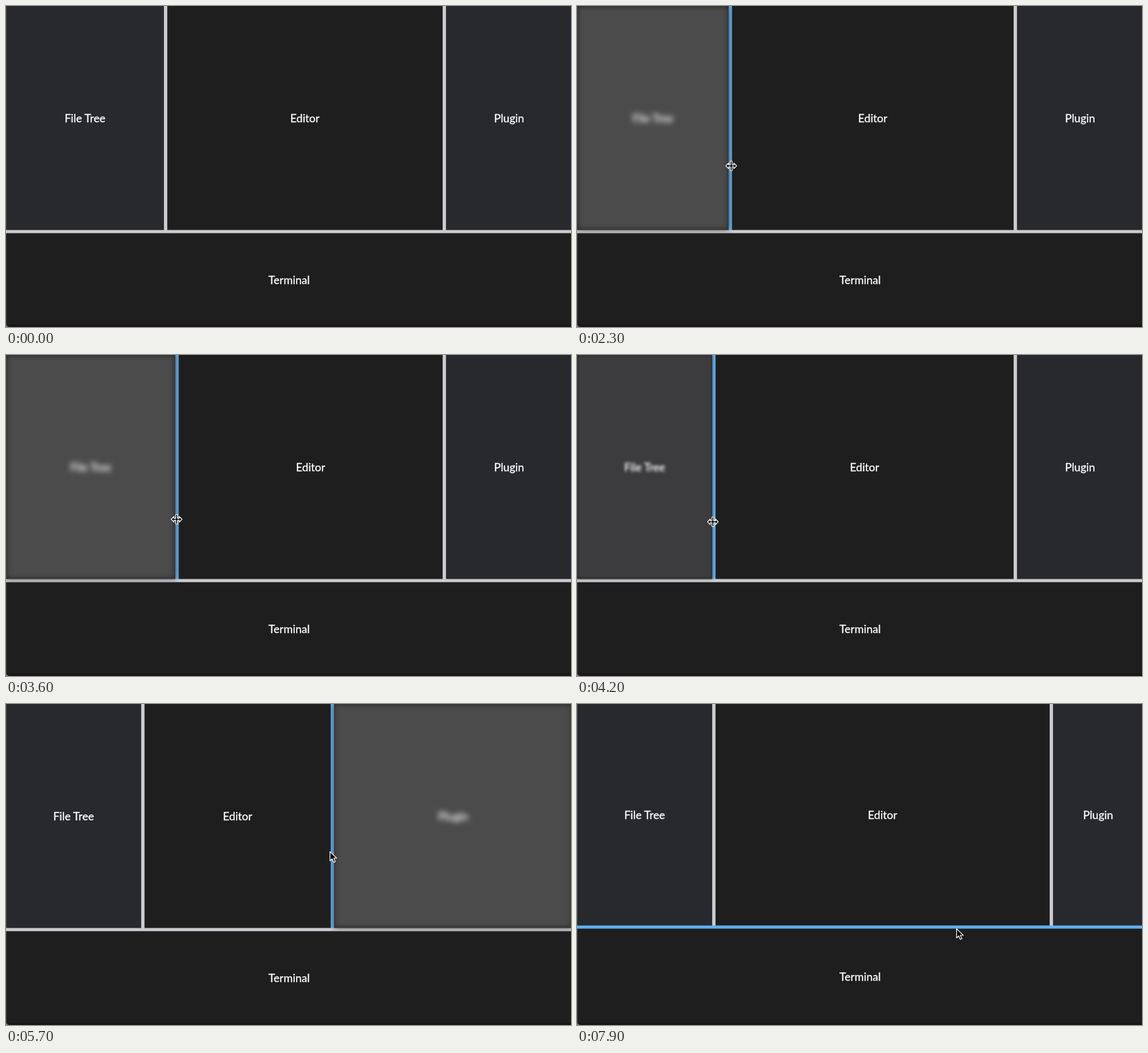
An HTML page for the animation above (8000 ms loop, 894 by 508 pixels).

```html
<!DOCTYPE html>
<html lang="en">
<head>
<meta charset="utf-8">
<title>Resizable panes</title>
<style>
  html, body { margin: 0; width: 100%; height: 100%; overflow: hidden; background: #1e1e1e; }
  #stage { position: relative; width: 894px; height: 508px; overflow: hidden; background: #1e1e1e; }
  #stage > * { position: absolute; }
  .pane {
    display: flex; align-items: center; justify-content: center;
    color: #fff; font: 17.6px Lato, sans-serif; white-space: nowrap;
    -webkit-text-stroke: .3px #fff;
  }
  #editor, #terminal { background: #1e1e1e; }
  #base { left: 0; top: 504px; width: 894px; height: 4px; background: #1c1518; }
  #corner { left: 0; top: 500px; width: 8px; height: 8px;
    background: radial-gradient(circle at 8px 0, transparent 8px, #77767a 9.5px); }
  #edge { left: 0; top: 0; width: 1px; height: 504px; background: rgba(255, 255, 255, .14); }
  #bars { left: 0; top: 0; z-index: 1; }
  #pointer { left: 0; top: 0; z-index: 3; overflow: visible; }
  #pointer path { fill: #000; stroke: #fff; stroke-width: 1.2; stroke-linejoin: round; }
</style>
</head>
<body>
<div id="stage">
  <div id="editor" class="pane">Editor</div>
  <div id="terminal" class="pane">Terminal</div>
  <div id="tree" class="pane">File Tree</div>
  <div id="plugin" class="pane">Plugin</div>
  <svg id="bars" width="894" height="508">
    <rect id="leftBar"/>
    <rect id="rightBar"/>
    <rect id="bottomBar"/>
  </svg>
  <div id="base"></div>
  <div id="corner"></div>
  <div id="edge"></div>
  <svg id="pointer" width="1" height="1">
    <path id="arrow" d="M.6 .6V15.2L4 12L6.4 17.6L9 16.5L6.6 11H11.2Z"/>
    <path id="resize" d="M-8.5 0L-4 -4.5V-1.4H-1.4V-7.5H1.4V-1.4H4V-4.5L8.5 0L4 4.5V1.4H1.4V7.5H-1.4V1.4H-4V4.5Z"/>
  </svg>
</div>
<script>
const WIDTH = 896, HEIGHT = 508, BAR = 5, LOOP = 8000, STEP = 100;
const $ = id => document.getElementById(id);

const ramp = (t, start, end) => Math.min(1, Math.max(0, (t - start) / (end - start)));
const ease = (t, start, end) => {
  const k = ramp(t, start, end);
  return k * k * (3 - 2 * k);
};
const pulse = (t, on, off, fade) => ramp(t, on, on + fade) - ramp(t, off, off + fade);

function blend(from, to, k) {
  return `rgb(${from.map((c, i) => Math.round(c + (to[i] - c) * k))})`;
}

function placePane(id, x, y, w, h) {
  const style = $(id).style;
  style.left = x + "px";
  style.top = y + "px";
  style.width = w + "px";
  style.height = h + "px";
  return style;
}

// A held pane turns grey and blurs out over its neighbouring bars.
function drawSidePane(id, blur, ...box) {
  const style = placePane(id, ...box);
  style.background = blend([40, 41, 44], [75, 75, 75], blur);
  style.filter = blur ? `blur(${4 * blur}px)` : "none";
  style.zIndex = blur ? 2 : 0;
}

function drawBar(id, glow, x, y, width, height) {
  const fill = blend([203, 203, 208], [97, 175, 239], glow);
  for (const [name, value] of Object.entries({ x, y, width, height, fill })) {
    $(id).setAttribute(name, value);
  }
}

function pointerAt(t, left, right, bottom) {
  let x = 365, y = 424;
  const glide = (start, end, toX, toY) => {
    const k = ease(t, start, end);
    x += (toX - x) * k;
    y += (toY - y) * k;
  };
  glide(900, 1000, 287, 366);
  glide(1300, 1700, left + 5, 255);
  glide(1700, 2900, left + 3, 250);
  glide(2900, 4000, left + 1, 264);
  glide(4200, 4800, right, 245);
  glide(5000, 5700, right - 2, 233);
  glide(6100, 6800, right + 6, 227);
  glide(7100, 7600, 600, bottom + 5);
  return [Math.round(x), Math.round(y)];
}

function draw(t) {
  const left = Math.round(250 - 100 * ease(t, 2200, 2700) + 124 * ease(t, 2700, 3450) - 60 * ease(t, 3500, 4000));
  const right = Math.round(691 - 191 * ease(t, 5200, 5800) + 248 * ease(t, 6100, 6700));
  const bottom = 354 - 4 * ramp(t, 7800, 7900);

  placePane("editor", left + BAR, 0, right - left - BAR, bottom);
  placePane("terminal", 0, bottom + BAR, WIDTH, HEIGHT - bottom - BAR);
  drawSidePane("tree", pulse(t, 1900, 4050, 350), 0, 0, left, bottom);
  drawSidePane("plugin", pulse(t, 5000, 6850, 350), right + BAR, 0, WIDTH - right - BAR, bottom);

  drawBar("leftBar", pulse(t, 1700, 4200, 200), left - .1, 0, BAR + .3, bottom + 1);
  drawBar("rightBar", pulse(t, 4800, 7000, 200), right - .1, 0, BAR + .3, bottom + 1);
  drawBar("bottomBar", ramp(t, 7500, 7700), 0, bottom + .5, WIDTH, BAR);

  const [x, y] = pointerAt(t, left, right, bottom);
  const resizing = t >= 1800 && t < 4300;
  $("pointer").style.display = t < 900 ? "none" : "block";
  $("pointer").style.transform = `translate(${x}px, ${y}px)`;
  $("arrow").style.display = resizing ? "none" : "inline";
  $("resize").style.display = resizing ? "inline" : "none";
}

function tick() {
  const t = performance.now() % LOOP;
  draw(Math.floor(t / STEP) * STEP);
  requestAnimationFrame(tick);
}
tick();
</script>
</body>
</html>
```
